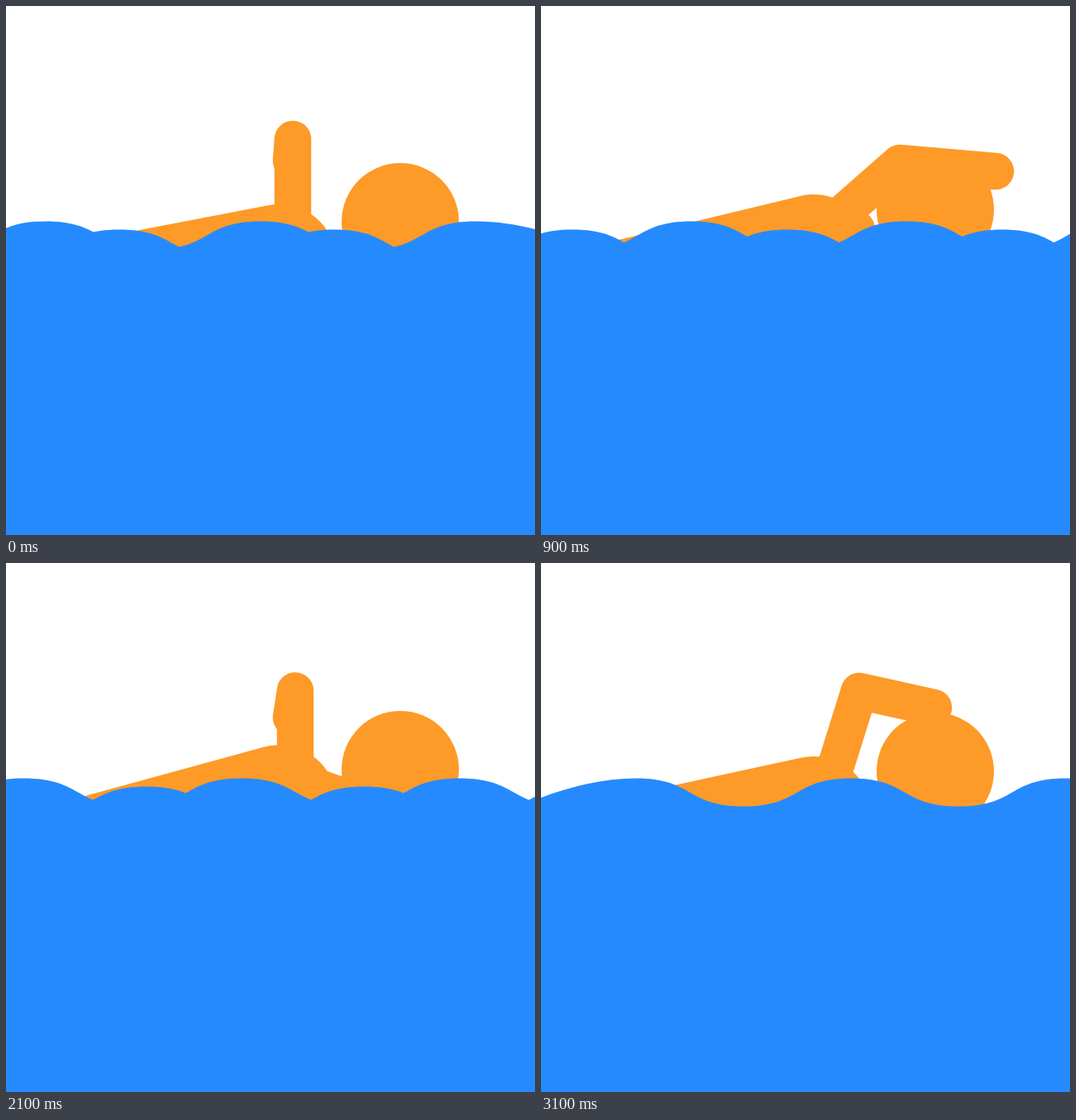
Animation, 640 px wide and 640 px high, one loop 3.2 s. Source, as an HTML page with a canvas:

```html
<!DOCTYPE html>
<html lang="en">
<head>
<meta charset="utf-8">
<title>Swimmer</title>
<style>
  html, body { margin: 0; width: 100%; height: 100%; overflow: hidden; background: #fff; }
  canvas { display: block; width: 100vmin; height: 100vmin; }
</style>
</head>
<body>
<canvas width="640" height="640"></canvas>
<script>
const ctx = document.querySelector('canvas').getContext('2d');
const ORANGE = '#fd9a28', BLUE = '#268aff';
const LOOP = 3200, STEP = 100;

// Tracks hold [seconds, ...values].
const headY = [[0, 261], [.6, 249], [.9, 246.5], [1.4, 241.5], [1.7, 241.5], [2.5, 257], [3.1, 252]];
const chestY = [[0, 310], [.6, 301], [.9, 298], [1.4, 292.5], [1.7, 291], [2.5, 291.5], [3.1, 304]];

// Arm values: shoulder, elbow, hand.
const strokes = [
  [[0, 347, 278, 347, 161, 345, 187], [.6, 344, 267, 385, 155, 463, 204],
   [.9, 345, 268, 434, 190, 550, 200], [1.15, 348, 268, 440, 280, 540, 330]],
  [[1.15, 348, 262, 250, 270, 200, 320], [1.4, 348, 262, 255, 204.5, 211, 263],
   [1.7, 350, 262, 285, 194.5, 215, 245], [2.1, 350, 266, 350, 154.5, 345, 187],
   [2.5, 348, 272, 395, 165, 475, 195], [2.75, 348, 270, 440, 280, 540, 330]],
  [[2.55, 348, 262, 250, 270, 200, 320], [2.8, 349, 264, 275, 198, 213, 255],
   [3, 349, 270, 347, 161, 345, 187], [3.1, 350, 267, 385, 155, 475, 175]]
];
const divingArm = [[0, 340, 300, 360, 320], [.6, 350, 270, 387, 298], [.9, 350, 268, 382, 270],
  [1.4, 355, 260, 410, 315], [1.7, 350, 268, 460, 308], [2.5, 348, 259, 460, 306], [3.1, 340, 300, 360, 320]];

const frontWave = [[0, 48], [.6, 312], [.9, 442], [1.4, 749], [1.7, 902], [2.5, 1215], [3.1, 1415], [3.2, 1448]];
const backWave = [[0, 137], [.6, 250], [.9, 298], [1.4, 435], [1.7, 538], [2.5, 855], [3.1, 1155], [3.2, 1205]];
const waveScale = [[0, 1], [.9, 1], [1.4, 1.016], [1.7, 1.01], [2.5, 1.016], [3.1, 1]];

// Smooth cubic interpolation through a track.
function at(track, t) {
  const last = track.length - 1;
  if (t <= track[0][0]) return track[0].slice(1);
  if (t >= track[last][0]) return track[last].slice(1);
  const i = track.findIndex(key => key[0] > t) - 1;
  const a = track[i], b = track[i + 1];
  const before = track[Math.max(i - 1, 0)], after = track[Math.min(i + 2, last)];
  const span = b[0] - a[0], u = (t - a[0]) / span;
  return a.slice(1).map((p, k) => {
    const q = b[k + 1];
    const m = (q - before[k + 1]) / (b[0] - before[0]) * span;
    const n = (after[k + 1] - p) / (after[0] - a[0]) * span;
    return p + u * (m + u * (3 * (q - p) - 2 * m - n + u * (2 * (p - q) + m + n)));
  });
}

function drawLimb(points) {
  ctx.beginPath();
  for (let i = 0; i < points.length; i += 2) ctx.lineTo(points[i], points[i + 1]);
  ctx.stroke();
}

function drawBody(y) {
  const foot = { x: 80, y: 309, r: 22 }, chest = { x: 330, y, r: 70 };
  const dx = chest.x - foot.x, dy = chest.y - foot.y;
  const angle = Math.atan2(dy, dx);
  const spread = Math.acos((foot.r - chest.r) / Math.hypot(dx, dy));
  ctx.beginPath();
  ctx.arc(chest.x, chest.y, chest.r, angle - spread, angle + spread);
  ctx.arc(foot.x, foot.y, foot.r, angle + spread, angle - spread + 2 * Math.PI);
  ctx.fill();
}

// Crests are 260 apart; the optional tails close a finite swell.
function drawWave(first, count, top, scale, tails) {
  const X = x => 230 + (x - 230) * scale;
  const curve = (x, a, b, c, d, e, f) =>
    ctx.bezierCurveTo(X(x + a), top + b, X(x + c), top + d, X(x + e), top + f);
  ctx.beginPath();
  ctx.moveTo(-2000, 640);
  if (tails) {
    ctx.lineTo(X(first - 175), top + 34);
    ctx.lineTo(X(first - 115), top + 23.5);
    curve(first, -80, 10, -40, 0, 0, 0);
  } else ctx.lineTo(X(first), top);
  for (let i = 0; i < count - 1; i++) {
    const x = first + i * 260;
    curve(x, 35, 0, 50, 8.5, 65, 17);
    curve(x, 80, 25.5, 95, 34, 130, 34);
    curve(x, 165, 34, 180, 25.5, 195, 17);
    curve(x, 210, 8.5, 225, 0, 260, 0);
  }
  if (tails) curve(first + (count - 1) * 260, 30, 0, 55, 5, 80, 11.5);
  ctx.lineTo(2600, 640);
  ctx.fill();
}

function draw(t) {
  ctx.fillStyle = '#fff';
  ctx.fillRect(0, 0, 640, 640);

  ctx.fillStyle = ctx.strokeStyle = ORANGE;
  ctx.lineWidth = 44.5;
  ctx.lineCap = ctx.lineJoin = 'round';
  drawLimb(at(divingArm, t));
  drawBody(at(chestY, t)[0]);
  for (const stroke of strokes) {
    const ended = stroke !== strokes[2] && t > stroke[stroke.length - 1][0];
    if (t >= stroke[0][0] && !ended) drawLimb(at(stroke, t));
  }
  ctx.beginPath();
  ctx.arc(477, at(headY, t)[0], 71, 0, 2 * Math.PI);
  ctx.fill();

  ctx.fillStyle = BLUE;
  const scale = at(waveScale, t)[0];
  drawWave(at(backWave, t)[0] % 260 - 520, 6, 270.5, scale, false);
  drawWave(at(frontWave, t)[0] - 1300, 8, 260.5, scale, true);
}

const start = performance.now();
function tick() {
  const time = (performance.now() - start) % LOOP;
  draw(Math.floor(time / STEP) * STEP / 1000);
  requestAnimationFrame(tick);
}
tick();
</script>
</body>
</html>
```
